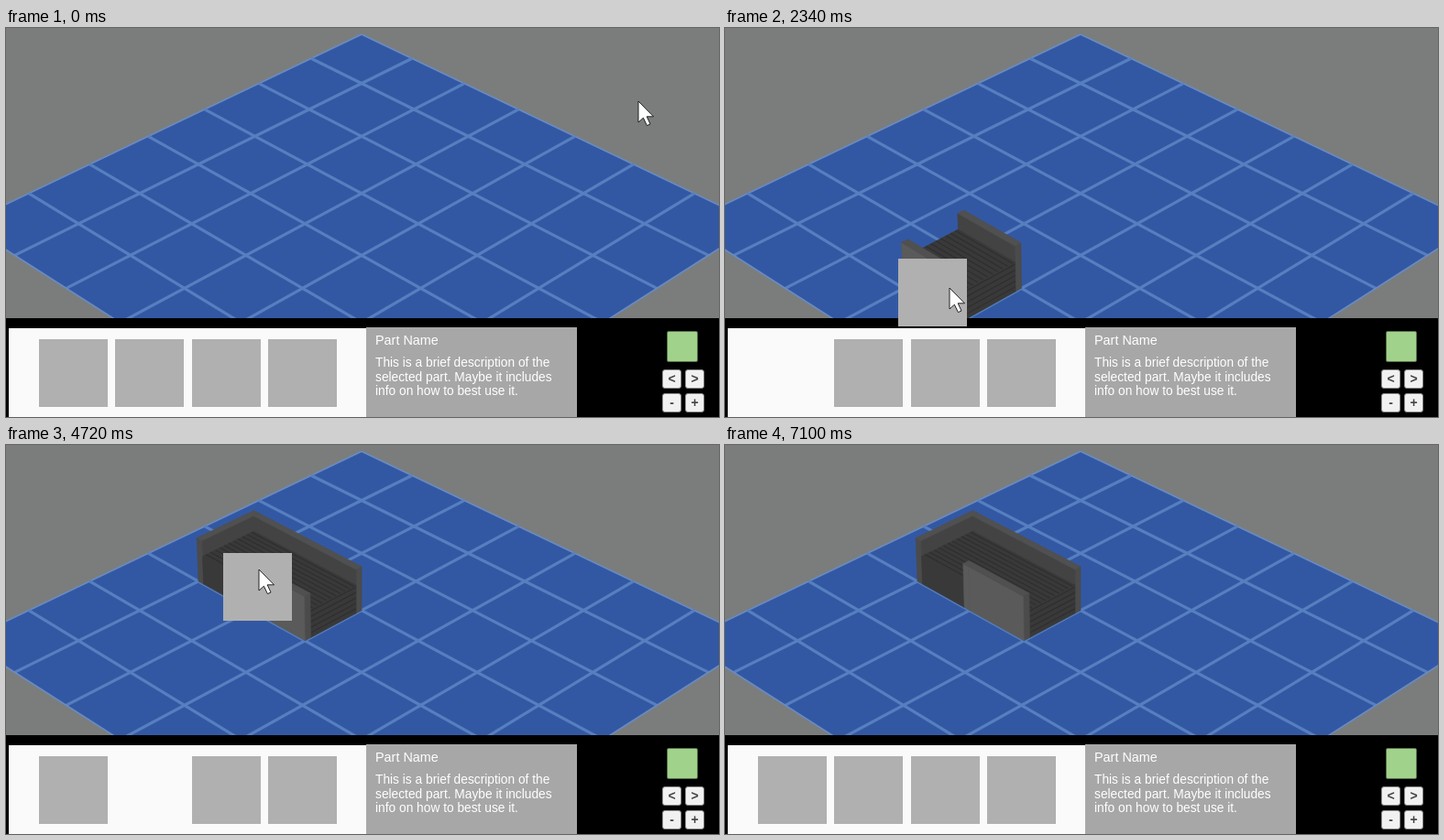
Write an HTML page with a canvas that moves like this. It is 778 by 425 pixels and loops after 7.94 s.

```html
<!DOCTYPE html>
<html lang="en">
<head>
<meta charset="utf-8">
<title>Part placement</title>
<style>
html, body { margin: 0; width: 100%; height: 100%; overflow: hidden; background: #7b7d7c; }
body * { position: absolute; box-sizing: border-box; }
#stage { left: 0; top: 0; width: 778px; height: 425px; overflow: hidden; font-family: "Liberation Sans", Arial, sans-serif; }
#floor { left: 0; top: 0; }
#bar { left: 0; top: 316.5px; width: 778px; height: 109px; background: #000; }
#tray { left: 3px; top: 328px; width: 390px; height: 97px; background: #fafafa; }
.tile { width: 75px; height: 74px; top: 340px; background: #b0b0b0; }
#info { left: 393px; top: 327px; width: 230px; height: 98px; background: #a7a7a7; color: #fff; }
#info h1, #info p { left: 10px; margin: 0; font-weight: normal; white-space: nowrap; }
#info h1 { top: 6px; font-size: 14.4px; line-height: 17px; }
#info p { top: 31px; font-size: 13.75px; line-height: 15.6px; }
#swatch { left: 721px; top: 331px; width: 34px; height: 34px; background: #a1d28b; border: 1px solid #56704a; border-radius: 2px; }
.key { width: 21px; height: 21px; background: #f1f1f1; border: 1px solid #8c8c8c; border-radius: 3px; color: #444; font: bold 14px/18px "Liberation Sans", Arial, sans-serif; text-align: center; }
.key.down { background: #d6d6d6; }
#cursor { left: 0; top: 0; width: 20px; height: 30px; overflow: visible; }
</style>
</head>
<body>
<div id="stage">
  <canvas id="floor" width="778" height="317"></canvas>
  <div id="bar"></div>
  <div id="tray"></div>
  <div class="tile" style="left:36px"></div>
  <div class="tile" style="left:119px"></div>
  <div class="tile" style="left:203px"></div>
  <div class="tile" style="left:285.5px"></div>
  <div id="info">
    <h1>Part Name</h1>
    <p>This is a brief description of the<br>selected part. Maybe it includes<br>info on how to best use it.</p>
  </div>
  <div id="swatch"></div>
  <div class="key" style="left:716px;top:373px">&lt;</div>
  <div class="key" id="turn" style="left:741px;top:373px">&gt;</div>
  <div class="key" style="left:716px;top:399px">-</div>
  <div class="key" style="left:741px;top:399px">+</div>
  <div class="tile" id="held"></div>
  <svg id="cursor"><path d="M0 0V23L5.4 18.2L9.4 26.6L13 25L9.2 16.8H16.5Z" fill="#fff" stroke="#111" stroke-width=".9"/></svg>
</div>
<script>
const LOOP = 7940, STEP = 70, LAG = 35, SIZE = 7;
const $ = id => document.getElementById(id);
const ctx = $('floor').getContext('2d');
const tiles = document.querySelectorAll('.tile');

// Pointer path: time, x, y
const path = [
  [0, 690, 80], [99, 690, 80], [100, 651, 94], [380, 651, 94],
  [870, 92, 372], [1010, 92, 372], [1220, 62, 245], [1360, 320, 275],
  [1500, 472, 256], [1570, 514, 248], [1710, 650, 150], [1850, 610, 85],
  [2060, 433, 33], [2200, 135, 110], [2270, 245, 284], [2340, 245, 284],
  [2690, 335, 182], [3040, 335, 182], [3390, 158, 358], [3460, 158, 358],
  [3810, 290, 270], [4090, 478, 190], [4370, 380, 62], [4650, 276, 136],
  [4720, 276, 136], [4860, 271, 143], [5000, 271, 143], [5560, 755, 396],
  [5770, 743, 382], [6890, 743, 382], [7030, 761, 386]
];
const drags = [
  { from: 1010, to: 3040, tile: 0, dx: 56, dy: 32, part: 'open', home: [2, 3] },
  { from: 3460, to: 5000, tile: 1, dx: 39, dy: 18, part: 'corner', home: [1, 3] }
];
const turns = [6050, 6330, 6540, 6820];

// Boxes inside a cell: a0, a1, b0, b1, height
const T = .1, WALL = .65, BELT = .42;
const parts = {
  open: [[0, 1, 0, T, WALL], [0, 1, 1 - T, 1, WALL], [0, 1, T, 1 - T, BELT]],
  corner: [
    [T, 1, 0, T, WALL], [0, T, 0, 1, WALL], [1 - T, 1, 1 - T, 1, WALL],
    [T, 1 - T, T, 1, BELT], [1 - T, 1, T, 1 - T, BELT]
  ]
};

function pointer(t) {
  const i = path.findIndex(k => k[0] > t);
  if (i < 0) return path[path.length - 1].slice(1);
  if (i === 0) return path[0].slice(1);
  const [t0, x0, y0] = path[i - 1], [t1, x1, y1] = path[i];
  const f = (t - t0) / (t1 - t0);
  return [x0 + (x1 - x0) * f, y0 + (y1 - y0) * f];
}

// Camera: sideways scale, depth scale, rise, perspective
const SX = 54, SY = 25.7, SZ = 67.7, P = .018;

function project(a, b, z = 0) {
  const u = a - b, v = a + b, w = 1 - P * (v + .77 * z);
  return [388 + SX * u / w, (7 + SY * v - SZ * z) / w];
}

function cellAt([x, y]) {
  const v = (y - 7) / (SY + P * y);
  const u = (x - 388) * (1 - P * v) / SX;
  return [(v + u) / 2, (v - u) / 2].map(n => Math.max(0, Math.min(SIZE - 1, Math.floor(n))));
}

function trace(points) {
  ctx.beginPath();
  points.forEach(p => ctx.lineTo(...project(...p)));
}

function face(fill, ...points) {
  trace(points);
  ctx.closePath();
  ctx.fillStyle = ctx.strokeStyle = fill;
  ctx.lineWidth = .6;
  ctx.fill();
  ctx.stroke();
}

function line(color, width, p, q) {
  trace([p, q]);
  ctx.strokeStyle = color;
  ctx.lineWidth = width;
  ctx.stroke();
}

function drawFloor() {
  ctx.fillStyle = '#7b7d7c';
  ctx.fillRect(0, 0, 778, 317);
  face('#3358a3', [0, 0], [SIZE, 0], [SIZE, SIZE], [0, SIZE]);
  for (let i = 0; i <= SIZE; i++) {
    const edge = i % SIZE === 0;
    const color = edge ? '#6a8cc4' : '#567fc0', width = edge ? 1.6 : 3.2;
    line(color, width, [i, 0], [i, SIZE]);
    line(color, width, [0, i], [SIZE, i]);
  }
}

function drawBox({ r: [a0, a1, b0, b1], h, alongA }) {
  const wall = h === WALL, longA = a1 - a0 > b1 - b0 - .01;
  const whole = n => Math.abs(n - Math.round(n)) < .01;
  const side = (end, long) => !wall ? '#393939' : !long ? '#4b4b4b' : whole(end) ? '#5a5a5a' : '#434343';
  face(side(a1, !longA), [a1, b0, 0], [a1, b1, 0], [a1, b1, h], [a1, b0, h]);
  face(side(b1, longA), [a0, b1, 0], [a1, b1, 0], [a1, b1, h], [a0, b1, h]);
  face(wall ? '#505050' : '#393939', [a0, b0, h], [a1, b0, h], [a1, b1, h], [a0, b1, h]);
  if (wall) return;
  const rib = '#2f2f2f';
  const gap = .08;
  if (alongA) for (let b = b0 + gap / 2; b < b1; b += gap) line(rib, 1.3, [a0, b, h], [a1, b, h]);
  else for (let a = a1 - gap / 2; a > a0; a -= gap) line(rib, 1.3, [a, b0, h], [a, b1, h]);
  for (let z = .07; z < h; z += gap) {
    if (alongA) line(rib, 1.3, [a1, b0, z], [a1, b1, z]);
    else line(rib, 1.3, [a0, b1, z], [a1, b1, z]);
  }
}

const before = (p, q) => p[1] <= q[0] + .001 || p[3] <= q[2] + .001;

// Back-to-front order, picked one box at a time
function drawParts(list, view) {
  let boxes = list.flatMap(({ part, cell: [a, b] }) => parts[part].map(([a0, a1, b0, b1, h]) => {
    let r = [a + a0, a + a1, b + b0, b + b1];
    for (let i = 0; i < view; i++) r = [SIZE - r[3], SIZE - r[2], r[0], r[1]];
    return { r, h, alongA: view % 2 === 0 };
  }));
  while (boxes.length) {
    const next = boxes.find(x => !boxes.some(y => y !== x && before(y.r, x.r) && !before(x.r, y.r))) || boxes[0];
    drawBox(next);
    boxes = boxes.filter(x => x !== next);
  }
}

function render(time) {
  const t = time < 100 ? 0 : 100 + Math.floor((time - 100) / STEP) * STEP;
  const [x, y] = pointer(t), late = pointer(t - LAG);
  const drag = drags.find(d => t >= d.from && t < d.to);
  const list = drags.filter(d => t >= d.to).map(d => ({ part: d.part, cell: d.home }));
  if (drag && late[1] < 317) list.push({ part: drag.part, cell: cellAt(late) });

  drawFloor();
  drawParts(list, turns.filter(n => t >= n).length % 4);

  for (let i = 0; i < 4; i++) tiles[i].style.visibility = drag && drag.tile === i ? 'hidden' : 'visible';
  const held = $('held').style;
  held.visibility = drag ? 'visible' : 'hidden';
  if (drag) {
    held.left = Math.round(late[0] - drag.dx) + 'px';
    held.top = Math.round(late[1] - drag.dy) + 'px';
  }
  $('turn').classList.toggle('down', t >= 5910 && t < 6960);
  $('cursor').style.transform = `translate(${Math.round(x)}px, ${Math.round(y)}px)`;
  $('cursor').style.visibility = t < 7100 ? 'visible' : 'hidden';
}

const start = performance.now();
function tick() {
  render((performance.now() - start) % LOOP);
  requestAnimationFrame(tick);
}
tick();
</script>
</body>
</html>
```
